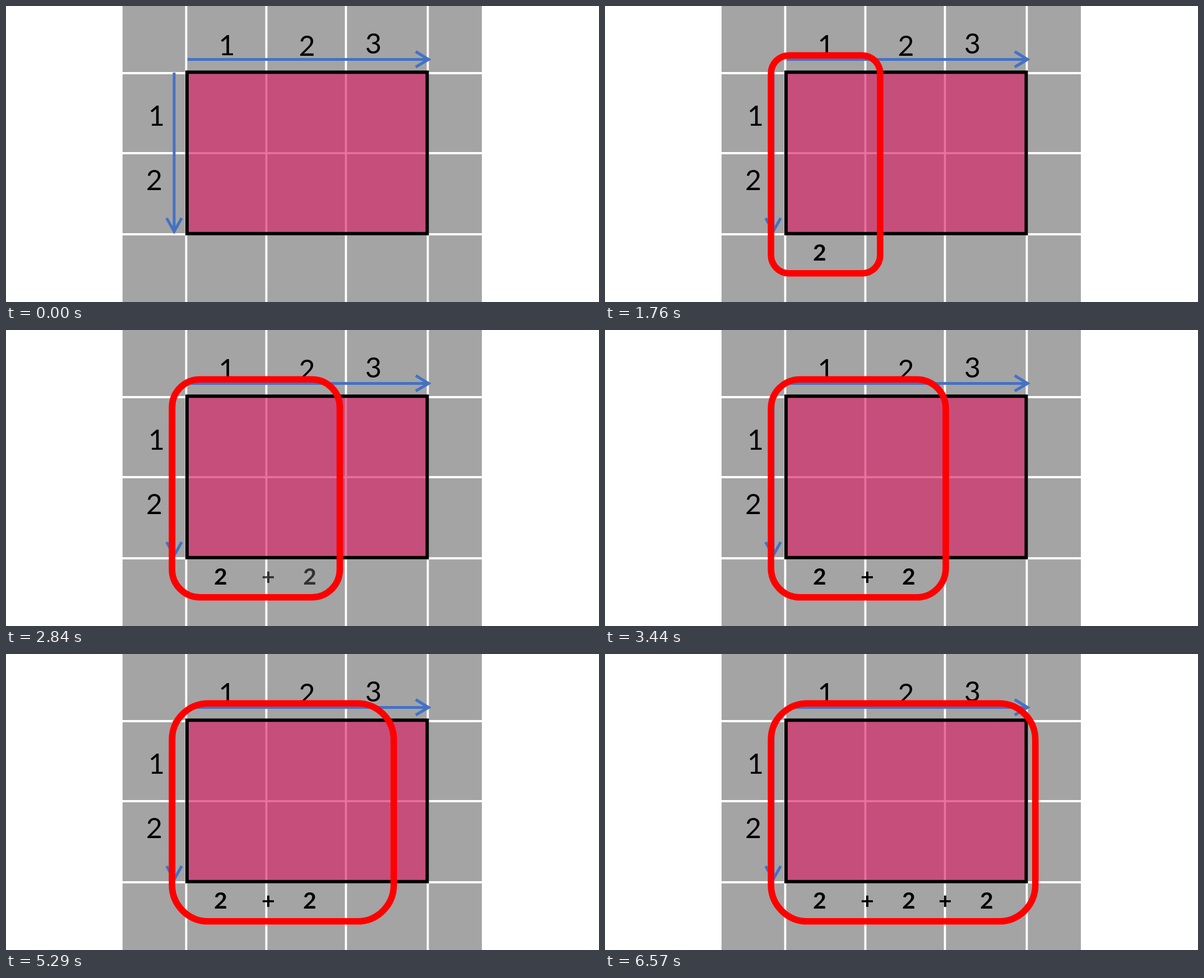
An HTML page for the animation above (8.75 s loop, 1058 px wide and 529 px high).

```html
<!DOCTYPE html>
<html lang="en">
<head>
<meta charset="utf-8">
<title>Counting columns</title>
<style>
  html, body { margin: 0; width: 100%; height: 100%; overflow: hidden; background: #fff; }
  svg { display: block; width: 1058px; height: 529px; }
  text { font-family: Lato, Carlito, sans-serif; text-anchor: middle; }
  .label { font-size: 50px; }
  .sum { font-size: 41px; font-weight: 700; }
  .grid { stroke: #fff; stroke-width: 3.8; }
  .arrow { fill: none; stroke: #4472c4; stroke-width: 5; }
</style>
</head>
<body>
<svg viewBox="0 0 1058 529">
  <rect x="208" width="641" height="529" fill="#a4a4a4"/>
  <path class="grid" d="M321.5 0V529M464.5 0V529M606.5 0V529M752.5 0V529M208 120H849M208 263H849M208 408H849"/>
  <rect x="323" y="118" width="428.5" height="289" fill="#c64e7b"/>
  <path d="M464.5 118V407M606.5 118V407M323 263H751" stroke="#e8739f" stroke-width="3.6"/>
  <rect x="323" y="118.3" width="428.5" height="288.5" fill="none" stroke="#000" stroke-width="6"/>
  <path class="arrow" d="M324 95.5H754M731 81.5L754 95.5L731 109M300 119V404M286.5 379L300 403L313.5 379"/>
  <g class="label">
    <text x="394" y="88">1</text>
    <text x="537" y="88.5">2</text>
    <text x="655.5" y="85">3</text>
    <text x="268.5" y="214">1</text>
    <text x="264.5" y="329">2</text>
  </g>
  <g class="sum">
    <text class="part" x="383" y="455">2</text>
    <g class="part"><text x="468" y="455">+</text><text x="542" y="455">2</text></g>
    <g class="part"><text x="607" y="455">+</text><text x="681" y="455">2</text></g>
  </g>
  <rect id="ring" x="296.2" y="88.2" height="389.6" fill="none" stroke="#f00" stroke-width="11.6"/>
</svg>
<script>
const LOOP = 8750, STEP = 40;
const FADE = 1480, MORPH = 1960;
const STARTS = [1560, 4650];      // when each widening begins
const RIGHTS = [476.2, 608, 767.8]; // centre line of the ring's right side

const ring = document.getElementById('ring');
const parts = document.querySelectorAll('.part');
const clamp = v => Math.min(1, Math.max(0, v));

const curve = (s, a, b) => 3 * (1 - s) * (1 - s) * s * a + 3 * (1 - s) * s * s * b + s * s * s;

// cubic-bezier(.25, .08, .35, 1)
function ease(u) {
  if (u <= 0 || u >= 1) return clamp(u);
  let lo = 0, hi = 1;
  for (let i = 0; i < 24; i++) {
    const mid = (lo + hi) / 2;
    if (curve(mid, .25, .35) < u) lo = mid; else hi = mid;
  }
  return curve(lo, .08, 1);
}

// Whole steps since a start, counting the first picture as one
const progress = (t, start) =>
  t < start ? 0 : clamp((Math.floor((t - start) / STEP) + 1) * STEP / MORPH);

function draw(t) {
  const shown = clamp(Math.floor(t / STEP) * STEP / FADE);
  ring.setAttribute('opacity', shown);
  parts[0].setAttribute('opacity', shown);

  let right = RIGHTS[0];
  STARTS.forEach((start, i) => {
    const u = progress(t, start);
    right += (RIGHTS[i + 1] - RIGHTS[i]) * ease(u);
    parts[i + 1].setAttribute('opacity', clamp((u - .38) / .42));
  });

  const width = right - 296.2;
  ring.setAttribute('width', width);
  ring.setAttribute('rx', Math.min(width, 389.6) / 6);
}

const begin = performance.now();
function tick() {
  draw((performance.now() - begin) % LOOP);
  requestAnimationFrame(tick);
}
tick();
</script>
</body>
</html>
```
